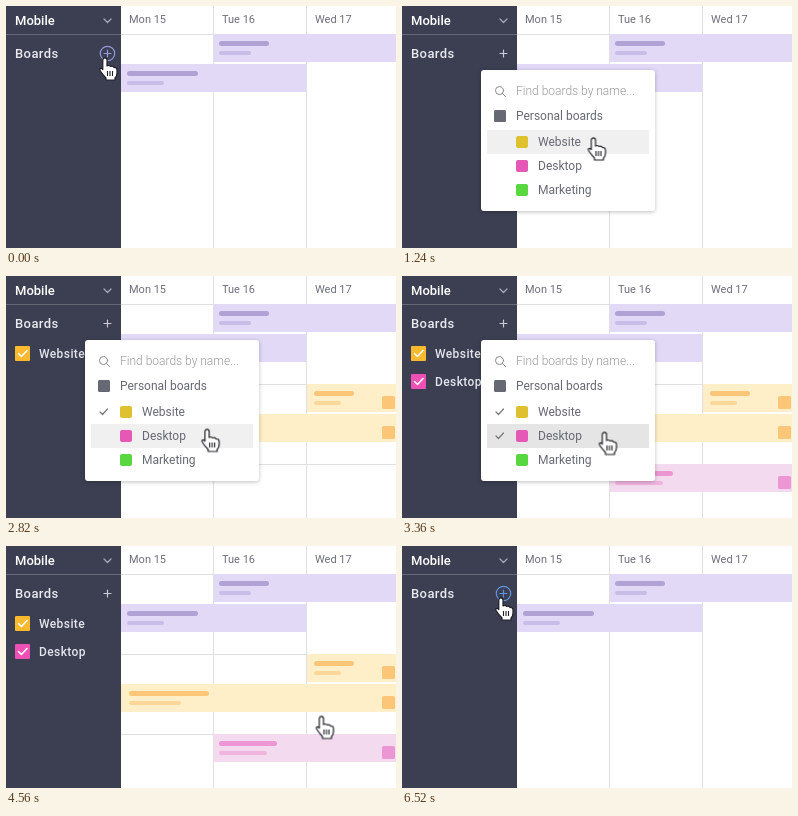
Animation, 390 px wide and 242 px high, one loop 6550 ms. Source, as an HTML page:

```html
<!DOCTYPE html>
<html lang="en">
<head>
<meta charset="utf-8">
<title>Boards filter</title>
<style>
  html, body { margin: 0; width: 100%; height: 100%; overflow: hidden; background: #fff; }
  svg { display: block; width: 390px; height: 242px; }
  text { font-family: Roboto, sans-serif; font-size: 12px; fill: #666873; }
  .day { font-size: 11px; fill: #6d6e7c; }
  .title { font-size: 13px; font-weight: 500; fill: #fff; }
  .heading { font-size: 13px; font-weight: 500; letter-spacing: .4px; fill: #e9eaf0; }
  .item { font-weight: 500; letter-spacing: .4px; fill: #e4e5ec; }
  .search { font-weight: 300; fill: #999; }
  .line { fill: none; stroke-linecap: round; stroke-linejoin: round; }
  #popup { filter: drop-shadow(0 1px 2px rgba(0, 0, 0, .25)); }
</style>
</head>
<body>
<svg viewBox="0 0 390 242">
  <rect width="390" height="242" fill="#fff"/>
  <path d="M115 28.5H390M207.5 0V242M300.5 0V242" stroke="#e0e0e3"/>
  <path id="grid" d="M115 108.5H390M115 188.5H390" stroke="#e0e0e3"/>
  <text class="day" x="123" y="17">Mon 15</text>
  <text class="day" x="216" y="17">Tue 16</text>
  <text class="day" x="309" y="17">Wed 17</text>
  <g id="baseBars"></g>
  <g id="websiteBars"></g>
  <g id="desktopBars"></g>

  <rect width="115" height="242" fill="#3c3f52"/>
  <path d="M0 28.5H115" stroke="#666978"/>
  <text class="title" x="9" y="19">Mobile</text>
  <path class="line" d="M98 13l3.5 3.5L105 13" stroke="#a5a8b8" stroke-width="1.3"/>
  <text class="heading" x="9" y="52">Boards</text>
  <g id="add" class="line" stroke-width="1.2">
    <path d="M98 47.5h7M101.5 44v7"/>
    <circle id="ring" cx="101.5" cy="47.5" r="7.2"/>
  </g>
  <g id="websiteItem"></g>
  <g id="desktopItem"></g>

  <g id="popup">
    <rect x="79" y="64" width="174" height="141" rx="3" fill="#fff"/>
    <path class="line" d="M100.5 87.500l3 3" stroke="#888"/>
    <circle class="line" cx="97.500" cy="84.500" r="4" stroke="#888"/>
    <text class="search" x="114" y="89">Find boards by name...</text>
    <rect x="92" y="104" width="12" height="12" rx="1.5" fill="#666873"/>
    <text x="114" y="114">Personal boards</text>
    <g id="rows"></g>
  </g>

  <g id="cursor">
    <path d="M-2.200 2C-2.200-.8 2-.8 2 2V8Q4.200 6.800 5.500 8.500Q8 7.400 9 9.600Q12 9 12 12.500V15Q12 18 10 20V22H1V20C-1 18-3 15.500-4.600 13C-6 10.700-4 9.400-2.200 11.500Z"
          fill="#fff" stroke="#1e1f26" stroke-width="1.2" stroke-linejoin="round"/>
    <path d="M2.500 13v5M5 13v5M7.500 13v5" stroke="#1e1f26" stroke-width="1.1"/>
  </g>
</svg>
<script>
const LOOP = 6550;
const EASE = 'cubic-bezier(.65, 0, .35, 1)';
const HOLD = 'step-end';
const $ = id => document.getElementById(id);

const rect = (x, y, w, h, fill, rx = 0) =>
  `<rect x="${x}" y="${y}" width="${w}" height="${h}" rx="${rx}" fill="${fill}"/>`;

// A bar holds two text strokes and may carry a board badge at the right edge.
function bar(id, x, y, end, textX, long, short, [fill, dark, light], badge) {
  $(id).innerHTML += rect(x, y, end - x, 28, fill)
    + rect(textX, y + 7, long, 5, dark, 2.5)
    + rect(textX, y + 17, short, 4, light, 2)
    + (badge ? rect(376, y + 12, 13, 13, dark, 1.5) : '');
}
const lilac = ['#e1d9f6', '#b1a2d6', '#c8bde6'];
const yellow = ['#feefc8', '#fbc678', '#fcd797'];
const pink = ['#f4daee', '#ec97d3', '#f0b4df'];
bar('baseBars', 208, 28, 390, 213, 50, 32, lilac);
bar('baseBars', 115, 58, 300, 121, 71, 37, lilac);
bar('websiteBars', 301, 108, 390, 308, 40, 27, yellow, true);
bar('websiteBars', 115, 138, 390, 123, 80, 52, yellow, true);
bar('desktopBars', 208, 188, 390, 213, 58, 48, pink, true);

function sidebarItem(id, label, y, color) {
  $(id).innerHTML = rect(9, y, 15, 15, color, 1)
    + `<path class="line" d="M12.500 ${y + 7.5}l3 3 5.500-6" stroke="#fff" stroke-width="1.600"/>`
    + `<text class="item" x="33" y="${y + 12}">${label}</text>`;
}
sidebarItem('websiteItem', 'Website', 70, '#fbb92e');
sidebarItem('desktopItem', 'Desktop', 98, '#ee50b6');

[['website', 'Website', '#dfc130'], ['desktop', 'Desktop', '#e558b6'], ['marketing', 'Marketing', '#58d83e']]
  .forEach(([id, label, color], i) => {
    const y = 124 + 24 * i;
    $('rows').innerHTML += `<rect id="${id}Row" x="85" y="${y}" width="162" height="24" fill="#fff"/>`
      + `<path id="${id}Check" class="line" d="M94 ${y + 12}l2.500 2.500 5-5.500" stroke="#777" stroke-width="1.200" opacity="0"/>`
      + rect(114, y + 6, 12, 12, color, 2)
      + `<text x="136" y="${y + 16}">${label}</text>`;
  });

// steps: [time in ms, value, easing to the next step]
function play(id, prop, steps) {
  const last = steps[steps.length - 1];
  const frames = [...steps, [LOOP, last[1]]].map(([t, value, easing = 'linear']) =>
    ({ offset: t / LOOP, [prop]: value, easing }));
  if (frames[0].offset > 0) frames.unshift({ ...frames[0], offset: 0, easing: 'linear' });
  $(id).animate(frames, { duration: LOOP, iterations: Infinity }).startTime = start;
}
const start = document.timeline.currentTime || 0;
const at = (x, y) => `translate(${x}px, ${y}px)`;

play('cursor', 'transform', [
  [0, at(99, 52)], [680, at(99, 52), EASE],
  [1290, at(192, 132.5)], [2540, at(192, 132.5), EASE],
  [2950, at(202.5, 156.5)], [3970, at(202.5, 156.5), EASE],
  [4560, at(315.5, 170.5)], [5400, at(315.5, 170.5), EASE],
  [6190, at(99, 52)]
]);

const idle = '#c9cbd6', hover = '#949bdc', active = '#6095dc';
play('add', 'stroke', [
  [0, hover], [40, hover], [140, active, HOLD], [850, idle, HOLD],
  [6090, hover], [6370, hover], [6510, active]
]);
play('ring', 'opacity', [[0, 1, HOLD], [850, 0, HOLD], [6090, 1]]);

play('popup', 'opacity', [[0, 0], [320, 0], [450, 1], [4220, 1], [4400, 0]]);

play('grid', 'opacity', [[0, 0], [1700, 0], [1900, 1], [5620, 1], [5760, 0]]);

function select(name, enter, press, leave) {
  const light = '#f0f0f0', dark = '#e5e5e5';
  play(name + 'Row', 'fill', [
    [0, '#fff', HOLD], [enter, light, HOLD], [press, light], [press + 80, dark],
    [press + 330, dark], [press + 510, light, HOLD], [leave, '#fff']
  ]);
  const shown = [[0, 0], [press + 40, 0], [press + 170, 1], [5400, 1], [5560, 0]];
  for (const part of ['Bars', 'Item', 'Check']) play(name + part, 'opacity', shown);
}
select('website', 1130, 1650, 2770);
select('desktop', 2770, 3180, 4220);
</script>
</body>
</html>
```
